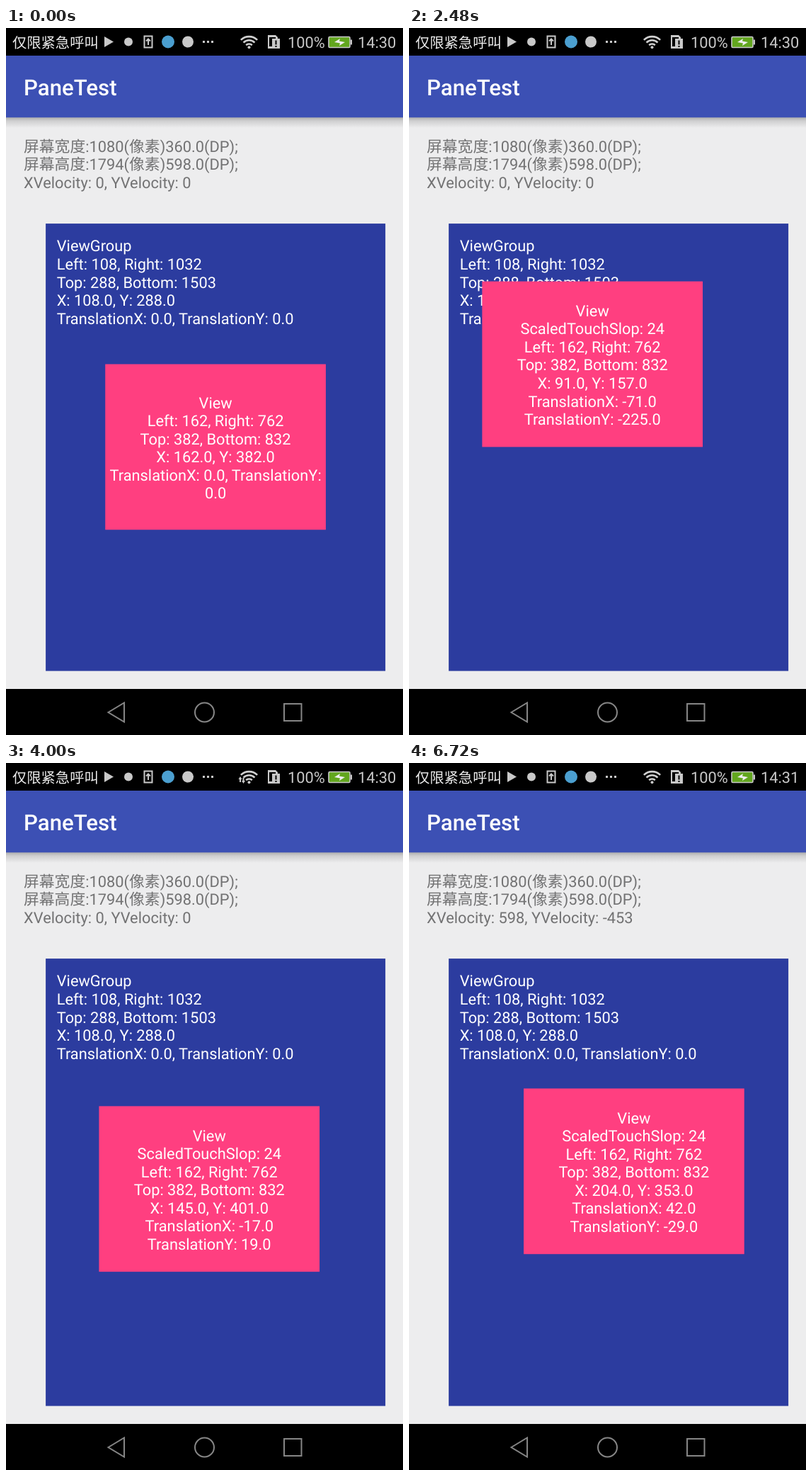
An HTML page for the animation above (6800 ms loop, 561x998 px).

```html
<!DOCTYPE html>
<html lang="zh-CN">
<head>
<meta charset="utf-8">
<title>PaneTest</title>
<style>
  html, body { margin: 0; width: 100%; height: 100%; overflow: hidden; background: #ededee; }
  svg { display: block; width: 561px; height: 998px; }
  text {
    font: 21.82px Roboto, "Noto Sans CJK SC", "Noto Sans CJK JP", sans-serif;
    fill: #fff; white-space: pre; text-rendering: geometricPrecision;
  }
  #info text { fill: #727273; }
  #view text { text-anchor: middle; }
  #status text { fill: #c9c9c9; }
  .line { fill: none; stroke: #868686; stroke-width: 2; }
</style>
</head>
<body>
<svg viewBox="0 0 561 998">
  <defs>
    <linearGradient id="shade" x2="0" y2="1">
      <stop offset="0" stop-color="#adadad"/>
      <stop offset=".35" stop-color="#cfcfd0"/>
      <stop offset="1" stop-color="#ededee"/>
    </linearGradient>
  </defs>
  <rect width="561" height="998" fill="#ededee"/>
  <rect y="126" width="561" height="15" fill="url(#shade)"/>
  <rect y="39" width="561" height="87.3" fill="#3c50b4"/>
  <text x="25" y="95" style="font-size:31.2px;font-weight:500">PaneTest</text>

  <g id="status" fill="#c9c9c9">
    <rect width="561" height="39" fill="#000"/>
    <text x="9" y="27.5" style="font-size:20.3px;fill:#eee">仅限紧急呼叫</text>
    <path d="M139 12l13 7.5l-13 7.5z"/>
    <circle cx="173" cy="19.5" r="6"/>
    <path d="M195.5 11.5h11v16h-11zM201 24v-8M198 18.5l3-3l3 3" class="line" style="stroke:#c9c9c9"/>
    <circle cx="229" cy="19.5" r="9" fill="#4b9fd0"/>
    <circle cx="257" cy="19.5" r="8"/>
    <path d="M278 19.5h16" stroke="#c9c9c9" stroke-width="3" stroke-dasharray="3"/>
    <g id="wifi"></g>
    <path id="traffic" d="M328.5 23l2.5-4l2.5 4h-1.5v4h-2v-4zM333 25l2.500 4l2.500-4h-1.500v-4h-2v4z"/>
    <path d="M370 10h11l3 3v2h-3v-2h-9v13h4v3h-6z"/>
    <path fill-rule="evenodd" d="M376 15h11v14h-11zM380.500 17.500v6h2v-6zM380.500 25v2h2v-2z"/>
    <text x="398" y="27.7">100%</text>
    <rect x="456" y="12.500" width="30" height="15" rx="1.500" fill="#62a61e" stroke="#c9c9c9" stroke-width="1.600"/>
    <rect x="487" y="16.500" width="2" height="7"/>
    <path d="M464 20l8-5l-1 3.500l8 1.500l-8 5l1-3.500z" fill="#eee"/>
    <text id="clock" x="497" y="27.7"></text>
  </g>

  <g id="info"></g>
  <rect x="56.1" y="276.1" width="480" height="631.5" fill="#2c3c9f"/>
  <g id="group"></g>
  <g id="view"></g>

  <rect y="933" width="561" height="65" fill="#000"/>
  <path class="line" d="M144.5 966l22.5-13.500v27z"/>
  <circle class="line" cx="280.5" cy="966" r="13.5"/>
  <rect class="line" x="393" y="954" width="24.5" height="24"/>
</svg>
<script>
const SCALE = 561 / 1080, LINE = 25.55, STEP = 80, LOOP = 6800;
const TOUCH = 2160, FLICK = 6320, FLICK_END = 6720;
const $ = id => document.getElementById(id);
const dec = n => n.toFixed(1);
const mix = (a, b, p) => Math.round(a + (b - a) * p);
const progress = (t, from, to) => Math.min(1, Math.max(0, (t - from) / (to - from)));

// Finger path: time and translation at each turn
const turns = [
  [TOUCH, -8, -10], [2480, -71, -225], [3040, -68, -172], [3680, -2, -25],
  [4160, -24, 41], [FLICK, -24, 41], [FLICK_END, 42, -29]
];

function translation(t) {
  const i = turns.findLastIndex(turn => turn[0] <= t);
  if (i < 0) return [0, 0];
  const [t0, x0, y0] = turns[i], [t1, x1, y1] = turns[i + 1] || [LOOP, x0, y0];
  const p = progress(t, t0, t1);
  return [mix(x0, x1, p), mix(y0, y1, p)];
}

function velocity(t) {
  if (t < 5840) return [0, 0];
  const p = progress(t, FLICK, FLICK_END);
  return [mix(30, 598, p), mix(-20, -453, p)];
}

const lines = (rows, x, y) =>
  rows.map((row, i) => `<text x="${x}" y="${y + i * LINE}">${row}</text>`).join('');

function arc(r) {
  const d = r * Math.SQRT1_2;
  return `<path d="M${343.5 - d} ${28.5 - d}a${r} ${r} 0 0 1 ${2 * d} 0" class="line"
    style="stroke:#d0d0d0;stroke-width:2.6"/>`;
}

$('wifi').innerHTML = [6, 11.2, 16.4].map(arc).join('') + '<circle cx="343.5" cy="27.3" r="2"/>';
$('group').innerHTML = lines([
  'ViewGroup', 'Left: 108, Right: 1032', 'Top: 288, Bottom: 1503',
  'X: 108.0, Y: 288.0', 'TranslationX: 0.0, TranslationY: 0.0'
], 71.7, 315.4);

function render(t) {
  const [x, y] = translation(t), [vx, vy] = velocity(t);
  const touched = t >= TOUCH;
  const rows = [
    'View', ...(touched ? ['ScaledTouchSlop: 24'] : []),
    'Left: 162, Right: 762', 'Top: 382, Bottom: 832',
    `X: ${dec(162 + x)}, Y: ${dec(382 + y)}`,
    ...(touched
      ? [`TranslationX: ${dec(x)}`, `TranslationY: ${dec(y)}`]
      : ['TranslationX: 0.0, TranslationY:', '0.0'])
  ];
  const w = 600 * SCALE, h = 450 * SCALE;
  $('view').setAttribute('transform',
    `translate(${56.1 + (162 + x) * SCALE} ${276.1 + (382 + y) * SCALE})`);
  $('view').innerHTML = `<rect width="${w}" height="${h}" fill="#ff3f80"/>` +
    lines(rows, w / 2, touched ? 49.2 : 62);
  $('info').innerHTML = lines([
    '屏幕宽度:1080(像素)360.0(DP);', '屏幕高度:1794(像素)598.0(DP);',
    `XVelocity: ${vx}, YVelocity: ${vy}`
  ], 25, 174.8);
  $('clock').textContent = t < 5120 ? '14:30' : '14:31';
  $('traffic').style.display = t >= 2880 && t < 5840 ? '' : 'none';
}

let shown = -1;
function tick() {
  const t = Math.floor(performance.now() % LOOP / STEP) * STEP;
  if (t !== shown) render(shown = t);
  requestAnimationFrame(tick);
}
tick();
</script>
</body>
</html>
```
